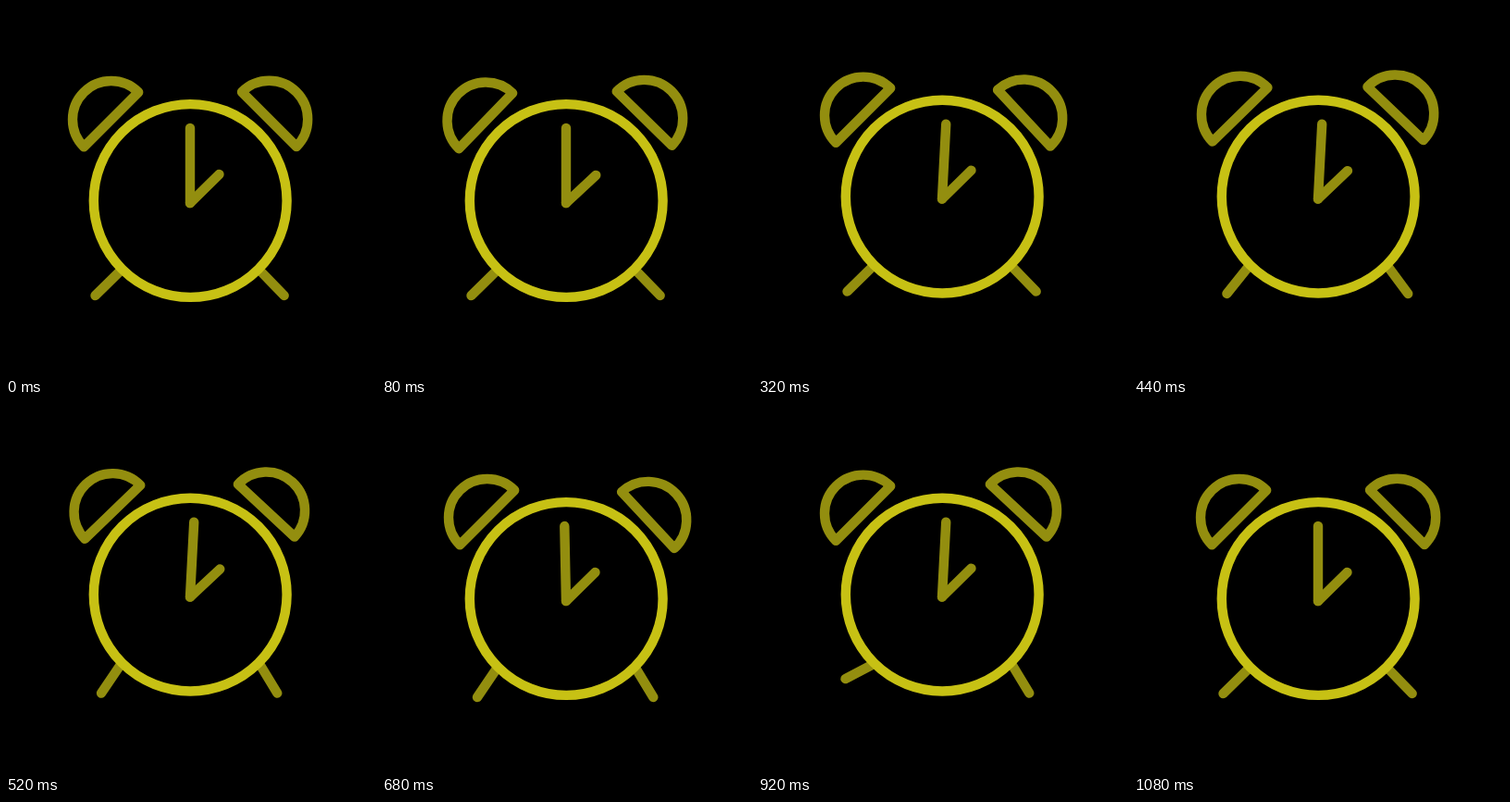
An HTML page for the animation above (1160 ms loop, 400 by 400 pixels).

```html
<!DOCTYPE html>
<html lang="en">
<head>
<meta charset="utf-8">
<title>Alarm clock</title>
<style>
  html, body { margin: 0; width: 100%; height: 100%; overflow: hidden; background: #000; }
  svg { display: block; width: 100%; height: 100%; }
  g { fill: none; stroke: #938e0f; stroke-width: 10.4; stroke-linecap: round; stroke-linejoin: round; }
  circle { stroke: #c7c114; }
</style>
</head>
<body>
<svg viewBox="0 0 400 400">
  <g id="clock">
    <path id="leftLeg"/>
    <path id="rightLeg"/>
    <path id="leftBell" d="M143.2 93.2 A41.7 41.7 0 0 0 84.2 152.2 Z"/>
    <path id="rightBell" d="M255 93 A41.7 41.7 0 0 1 314 152 Z"/>
    <path id="minute" d="M199 213 V132"/>
    <path id="hour" d="M199 213 L230.5 182"/>
    <circle cx="199.2" cy="210.5" r="104.4"/>
  </g>
</svg>
<script>
  const LOOP = 1160, TICK = 40, LAST_STEP = 32;
  const part = id => document.getElementById(id);
  const clamp = (value, low, high) => Math.max(low, Math.min(high, value));

  // Rises to 1, holds between two steps and falls back to 0.
  const bump = (step, from, to = from, ramp = 5) =>
    clamp(1 - Math.max(from - step, step - to, 0) / ramp, 0, 1);

  function rotate(id, angle, y) {
    part(id).setAttribute("transform", `rotate(${angle} 199 ${y})`);
  }

  function drawLeg(id, hipX, footX, footY) {
    part(id).setAttribute("d", `M${hipX} 286 L${footX} ${footY}`);
  }

  function draw(time) {
    // A 30 fps rattle shown at 25 fps, resting at the end.
    const tick = Math.floor((time % LOOP) / TICK);
    const step = Math.min(LAST_STEP, Math.floor(tick * 6 / 5));
    const up = step % 2 === 1;
    const first = bump(step, 4, 4, 4);
    const second = bump(step, 15);
    const third = bump(step, 23.5, 23.5, 3.5);
    const active = bump(step, 4, LAST_STEP - 5, 4);
    const sway = clamp(-3 * Math.sin(2 * Math.PI * (step - 1.25) / 11), -2, 2);

    part("clock").setAttribute("transform", `translate(0 ${up ? -4.4 : 0})`);
    rotate("leftBell", second - 2 * (first + third), 210.5);
    rotate("rightBell", sway * active, 210.5);
    rotate("minute", up ? 3 : -1.2 * bump(step, 20), 213);
    rotate("hour", 3 * first + 1.5 * second, 213);

    const leftIn = bump(step, 15, 20), leftOut = bump(step, 27);
    const rightIn = bump(step, 15, 27);
    drawLeg("leftLeg", 124, 96.5 + 6.5 * leftIn - 2 * leftOut, 313 + 4 * leftIn - 11.5 * leftOut);
    drawLeg("rightLeg", 274.5, 300.7 - 7.4 * rightIn, 313 + 4 * rightIn);
  }

  const start = performance.now();
  function loop() {
    draw(performance.now() - start);
    requestAnimationFrame(loop);
  }
  loop();
</script>
</body>
</html>
```
